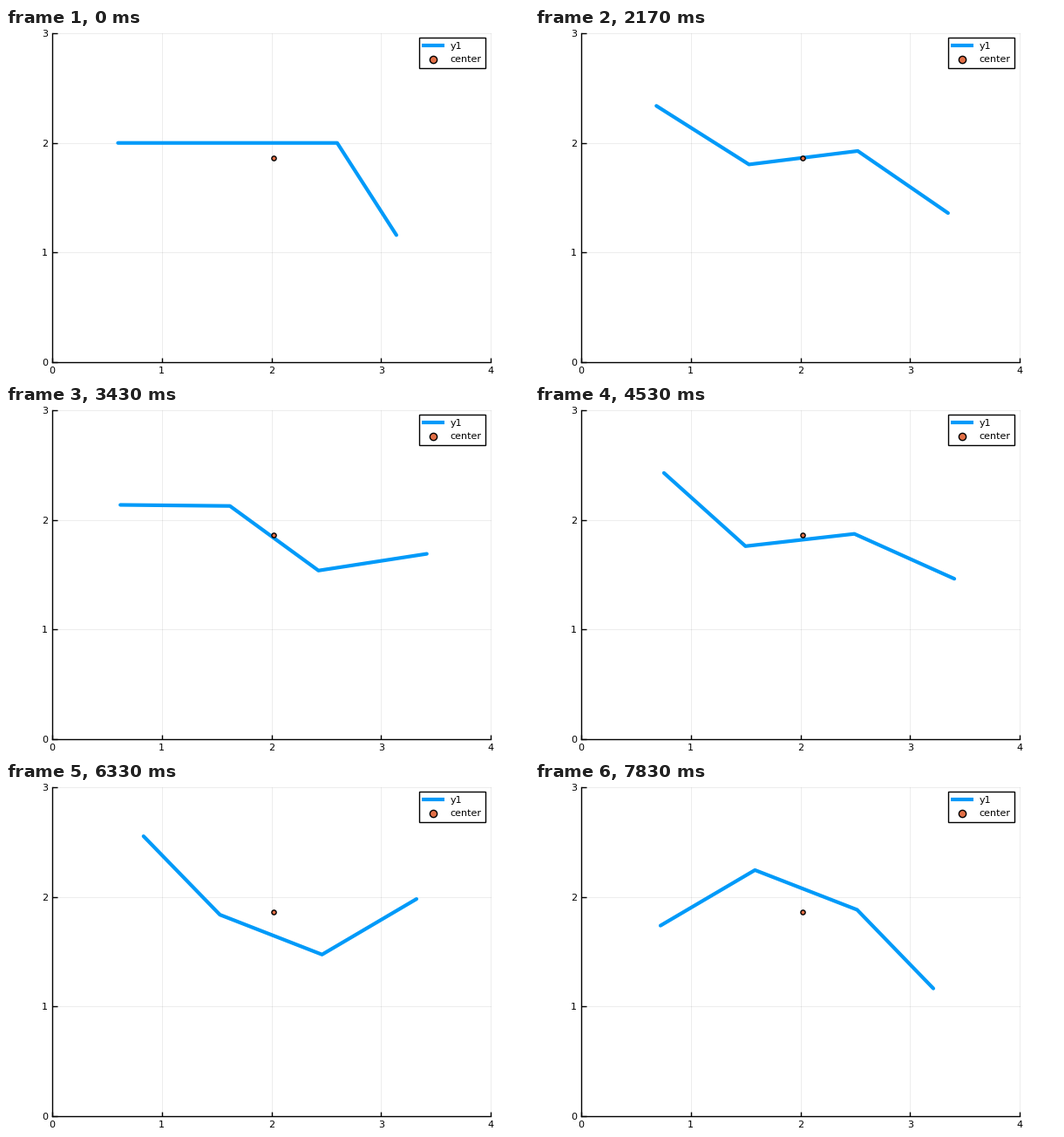
A matplotlib script for the animation above (7860 ms loop, 600 px wide and 400 px high).

```python
import matplotlib.pyplot as plt
import numpy as np
from matplotlib.animation import FuncAnimation
from matplotlib.patches import Rectangle

W, H, DPI = 600, 400, 100
FRAMES, LOOP = 236, 7860
STEP = 0.085           # joint phase per frame
SUB = 20               # integration steps per frame
INERTIA = 1 / 12       # unit rod about its middle
BLUE, ORANGE = "#009af9", "#e26f46"

plt.rcParams.update({"font.family": "DejaVu Sans", "font.size": 8})


def pt(px):
    return px * 72 / DPI


def joints(phase):
    return -np.sin(phase), -np.cos(phase)


def turn_rate(phase):
    """Spin of the middle rod that keeps the angular momentum at zero."""
    a, b = joints(phase)
    ca, cb, cab = np.cos(a), np.cos(b), np.cos(a + b)
    first = 1 / 6 + ca / 4 + cab / 12 + INERTIA
    middle = 1 / 2 + (ca + cb) / 4 + INERTIA
    last = 1 / 6 + cb / 4 + cab / 12 + INERTIA
    return -(first * np.cos(phase) + last * np.sin(phase)) / (first + middle + last)


def chain(angles):
    """Vertices of three unit rods, starting at the origin."""
    steps = np.column_stack([np.cos(angles), np.sin(angles)])
    return np.vstack([[0, 0], np.cumsum(steps, axis=0)])


def centroid(p):
    return (p[:-1] + p[1:]).mean(axis=0) / 2


fine = np.arange((FRAMES - 1) * SUB + 1) * STEP / SUB
rate = turn_rate(fine)
heading = np.concatenate([[0], np.cumsum((rate[1:] + rate[:-1]) / 2) * STEP / SUB])[::SUB]
center = centroid(chain(np.array([0, 0, -1])) + [0.6, 2])


def pose(i):
    a, b = joints(i * STEP)
    p = chain(heading[i] + np.array([-a, 0, b]))
    return p - centroid(p) + center


fig = plt.figure(figsize=(W / DPI, H / DPI), dpi=DPI, facecolor="white")
left, top, right, bottom = 53, 6.2, 556, 382.8
ax = fig.add_axes([left / W, 1 - bottom / H, (right - left) / W, (bottom - top) / H])
ax.set(xlim=(0, 4), ylim=(0, 3), xticks=range(5), yticks=range(4))
ax.set_axisbelow(True)
ax.grid(color="black", alpha=0.1, lw=0.5, clip_on=False)
ax.spines[["top", "right"]].set_visible(False)
ax.spines[["left", "bottom"]].set_linewidth(1)
ax.tick_params(direction="in", length=pt(5.5), width=1)
ax.tick_params(axis="x", pad=pt(5))
ax.tick_params(axis="y", pad=pt(5))

rod_style = dict(color=BLUE, lw=3, solid_capstyle="round", solid_joinstyle="round")
dot_style = dict(marker="o", ls="none", mfc=ORANGE, mec="black", mew=1)

rods, = ax.plot(*pose(0).T, **rod_style)
ax.plot(*center, ms=pt(5.2), zorder=3, **dot_style)

# Legend, in pixels
key = fig.add_axes([0, 0, 1, 1])
key.set(xlim=(0, W), ylim=(H, 0))
key.axis("off")
key.add_patch(Rectangle((474, 11), 76, 35, fc="white", ec="black", lw=1))
key.plot([477, 503], [20, 20], **{**rod_style, "solid_capstyle": "butt"})
key.plot(490.3, 36.3, ms=pt(8.3), **dot_style)
for y, label in ((24, "y1"), (39, "center")):
    key.text(509.5, y, label, va="baseline")


def update(i):
    rods.set_data(*pose(i).T)
    return rods,


anim = FuncAnimation(fig, update, frames=FRAMES, interval=LOOP / FRAMES, repeat=True)
plt.show()
```
